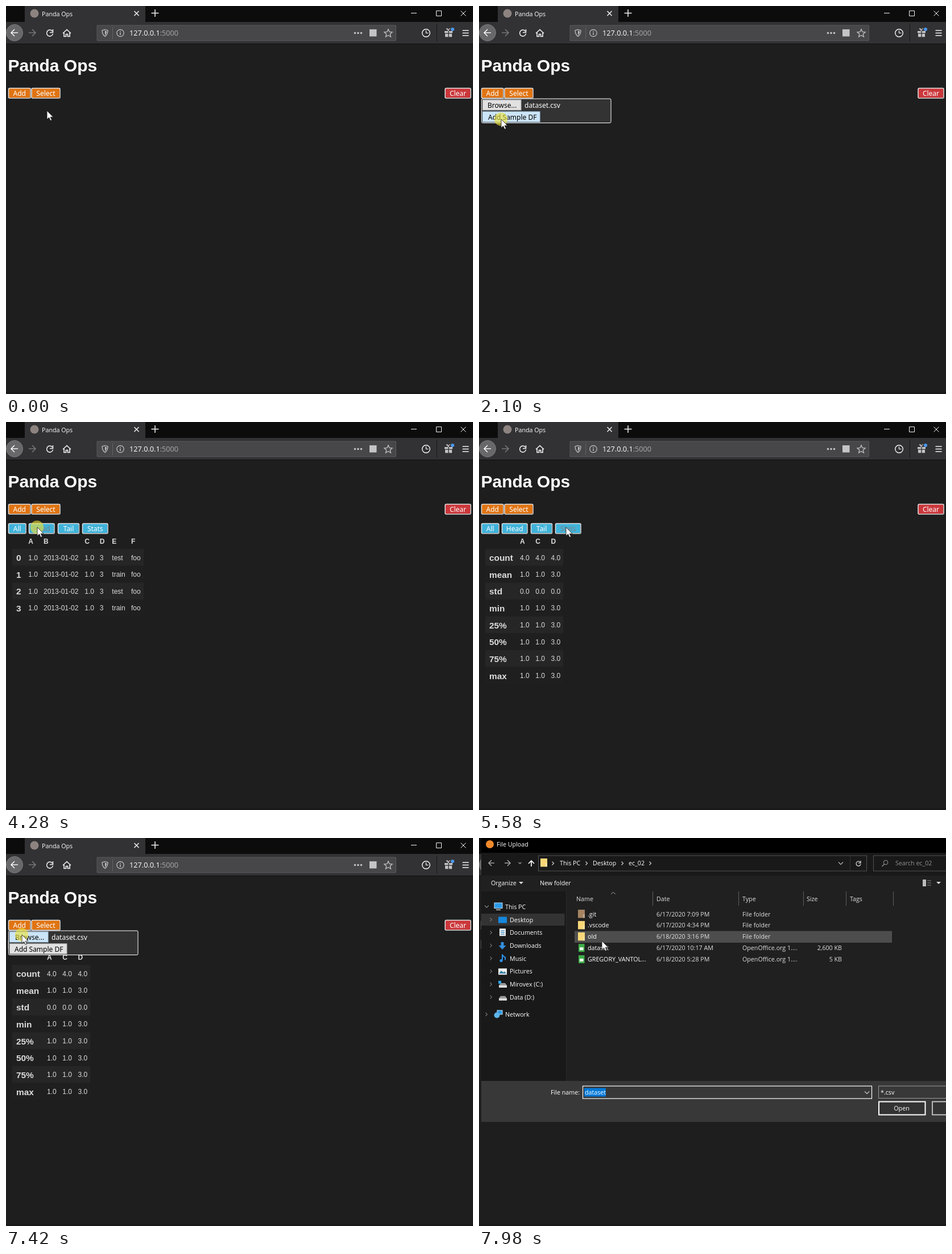
These frames come from a looping animation (821 px wide and 682 px high, 8000 ms). An HTML page:

```html
<!DOCTYPE html>
<html lang="en">
<head>
<meta charset="utf-8">
<title>Panda Ops</title>
<style>
  html, body { margin: 0; width: 100%; height: 100%; overflow: hidden; background: #1e1e1e; }
  svg { display: block; }
  text { white-space: pre; }
  .ui { font-family: "Open Sans", "Noto Sans", sans-serif; }
  .ctl { font-family: "Noto Sans", sans-serif; }
  .page { font-family: "Liberation Sans", Arial, sans-serif; }
  .bold { font-weight: bold; }
  .btn.hover text { fill: gray; }
  .native rect { fill: #e1e1e1; stroke: #adadad; }
  .native.hover rect { fill: #e5f1fb; stroke: #0078d7; }
  .native.down rect { fill: #cce4f7; stroke: #a9cdea; }
  .native.down text { transform: translateX(1px); }
</style>
</head>
<body>
<script>
const LOOP = 8000;

// Markup helpers
const rect = (x, y, w, h, fill, extra = '') =>
  `<rect x="${x}" y="${y}" width="${w}" height="${h}" fill="${fill}" ${extra}/>`;
const line = (d, color = '#fff', width = 1.2, fill = 'none') =>
  `<path d="${d}" stroke="${color}" stroke-width="${width}" fill="${fill}"/>`;
const circle = (x, y, r, fill, extra = '') =>
  `<circle cx="${x}" cy="${y}" r="${r}" fill="${fill}" ${extra}/>`;
const text = (x, y, s, size, fill = '#fff', cls = 'ui', anchor = 'start') =>
  `<text x="${x}" y="${y}" font-size="${size}" fill="${fill}" class="${cls}" text-anchor="${anchor}">${s}</text>`;
const group = (id, body, extra = '') => `<g id="${id}" ${extra}>${body}</g>`;
const chevRight = (x, y, color) => line(`M${x - 1.5} ${y - 3}l3 3l-3 3`, color, 1.1);
const chevDown = (x, y, color, s = 4) => line(`M${x - s} ${y - s / 2}l${s} ${s}l${s} ${-s}`, color, 1.1);
const triangle = (x, y) => `<path d="M${x - 4} ${y - 2}h8l-4 4z" fill="#ddd"/>`;
const arrow = (x, y, dir, color, s = 6) =>
  line(`M${x - s * dir} ${y}h${2 * s * dir}m${-s * dir} ${-s}l${s * dir} ${s}l${-s * dir} ${s}`, color, 1.6);
const reload = (x, y, r, color) =>
  line(`M${x + r * .8} ${y - r * .6}A${r} ${r} 0 1 0 ${x + r} ${y + 1}M${x + r} ${y - r - 1}v${r}h${-r}`, color, 1.5);

// Buttons with an outset border
const buttons = [
  ['Add', 4, 144, 39.5, '#e07412'], ['Select', 44.5, 144, 51, '#e07412'], ['Clear', 771.5, 144, 46, '#cb373b'],
  ['All', 4, 178, 31.5, '#40b3da'], ['Head', 40, 178, 45.5, '#40b3da'],
  ['Tail', 91, 178, 38, '#40b3da'], ['Stats', 134, 178, 45.5, '#40b3da']
];
const button = ([label, x, y, w, fill]) => group(label,
  rect(x + .5, y + .5, w - 1, 17.5, fill, 'rx="2" stroke="#e4e4e4" stroke-width="1.5"') +
  line(`M${x + 2} ${y + 18}h${w - 4}q1.5 0 1.5 -1.5v-14`, '#a9a9a9', 1.3) +
  text(x + w / 2, y + 14, label, 12, '#fff', 'ctl', 'middle'), 'class="btn"');

function browserChrome() {
  const w = '#f4f4f4', soft = '#c4c4c6';
  return rect(0, 0, 821, 28, '#0c0c0d') + rect(33, 0, 212, 28, '#323234') +
    circle(50, 13, 7.5, '#8d8380') + text(63, 18, 'Panda Ops', 10.7) +
    line('M225.5 9l8 8m0 -8l-8 8M262 6v13m-6.5 -6.5h13', w, 1.5) +
    group('controls', line('M712 12.5h10M756.5 8.5h9v9h-9zM799.5 8.5l9 9m0 -9l-9 9', w, 1)) +
    rect(0, 28, 821, 38, '#323234') + rect(0, 66, 821, 1, '#111') +
    circle(15, 47, 14.5, '#68686b', 'stroke="#7b7b7e"') + arrow(15, 47, -1, w) + arrow(46, 47, 1, '#77777a') +
    reload(77, 47.5, 5.5, w) +
    line('M100 48l7 -6.5l7 6.5M102 47v6.5h3.5v-4h3v4h3.5v-6.5', w, 1.6) +
    rect(160, 34, 525.5, 27, '#474749', 'stroke="#5b5b5d" rx="1"') +
    line('M174 41.5l5 1.5q0 7 -5 10.5q-5 -3.5 -5 -10.5z', soft, 1.3) + `<path d="M174 43.5l3 1q0 4 -3 7z" fill="${soft}"/>` +
    rect(187, 37, 1, 21, '#626264') + circle(201, 47.5, 6.2, 'none', `stroke="${soft}" stroke-width="1.2"`) +
    line('M201 46.5v4.5M201 43.8v1.4', soft, 1.4) +
    text(217, 52, '127.0.0.1<tspan fill="#a9a9ab">:5000</tspan>', 12.7) +
    [613.5, 619, 624.5].map(x => circle(x, 47.5, 1.8, soft)).join('') +
    rect(639, 41, 12.5, 12.5, soft) +
    line('M672 40.8l2 4.7l5 .4l-3.8 3.3l1.2 5l-4.4 -2.7l-4.4 2.7l1.2 -5l-3.8 -3.3l5 -.4z', soft, 1.3) +
    circle(738.5, 47.5, 6.8, 'none', `stroke="${w}" stroke-width="1.4"`) + line('M738.5 43v4.5h4', w) +
    rect(757, 31, 1, 32, '#19191a') +
    rect(771, 44, 6.3, 3.5, soft) + rect(778.7, 44, 6.3, 3.5, soft) + rect(772, 48.8, 5.3, 5.5, soft) +
    rect(778.7, 48.8, 5.3, 5.5, soft) + line('M778 43.5q-5 -4 -3 -4q2 0 3 4q1 -4 3 -4', soft) +
    circle(785, 41, 3, '#4a9af0') + line('M802.5 43h11m-11 4.5h11m-11 4.5h11', w, 1.5);
}

function table(id, width, columns, rows) {
  const pitch = 29.65;
  return group(id,
    columns.map(([x, name]) => text(x, 213.5, name, 12, '#dcdcdc', 'page bold')).join('') +
    rows.map(([head, ...cells], i) => {
      const y = 223 + i * pitch;
      return rect(11, y, width, pitch, i % 2 ? '#1f1f1f' : '#262626') +
        text(18, y + 21, head, 15.4, '#dcdcdc', 'page bold') +
        cells.map((c, k) => text(columns[k][0], y + 19.5, c, 12, '#dcdcdc', 'page')).join('');
    }).join(''));
}

const dataRows = [0, 1, 2, 3].map(i => [i, '1.0', '2013-01-02', '1.0', '3', i % 2 ? 'train' : 'test', 'foo']);
const statRows = ['count', 'mean', 'std', 'min', '25%', '50%', '75%', 'max'].map(name =>
  name === 'count' ? [name, '4.0', '4.0', '4.0'] : name === 'std' ? [name, '0.0', '0.0', '0.0'] : [name, '1.0', '1.0', '3.0']);

const nativeButton = (id, x, y, w, label) =>
  group(id, rect(x + .5, y + .5, w - 1, 18, '') + text(x + 9, y + 14.2, label, 12, '#000', 'ctl'), 'class="native"');
const panel = group('panel', rect(4.5, 163, 227.5, 42.5, '#333', 'stroke="#fff" rx="2"') +
  nativeButton('browse', 6, 164.5, 68.5, 'Browse...') + nativeButton('sample', 6, 185.3, 101.5, 'Add Sample DF') +
  text(80, 178.7, 'dataset.csv', 12, '#fff', 'ctl'));

function dialog() {
  const size = 10.7, label = (x, y, s, fill = '#fff', anchor) => text(x, y, s, size, fill, 'ui', anchor);
  const folder = (x, y, fill) => rect(x, y, 12, 14.5, fill) + rect(x + 9, y + 8, 3, 6.5, '#fff', 'opacity=".3"');
  const screen = (x, y) => rect(x, y, 14, 9.5, '#2d9be8', 'stroke="#bfe1f5"') + rect(x + 3, y + 11.5, 8, 1.5, '#ccc');
  const drive = (x, y) => `<path d="M${x} ${y + 4}l3 -4h8l3 4z" fill="#999"/>` + rect(x, y + 4, 14, 4, '#ddd');
  const icons = [
    y => rect(34, y - 5, 15, 11, '#1687dc'),
    y => rect(36, y - 7, 11, 13, '#f2f2f2') + line(`M38 ${y - 3}h7m-7 3h7m-7 3h7`, '#3788c0'),
    y => `<path d="M38.5 ${y - 6}h5v6h4l-6.5 7l-6.5 -7h4z" fill="#3490dc"/>`,
    y => line(`M41 ${y + 4}v-11q1 4 5 5v5`, '#2c8fe6', 2) + circle(39, y + 4, 2.6, '#2c8fe6'),
    y => rect(34, y - 5, 15, 11, '#f2f2f2') + `<path d="M35 ${y + 4}l4 -5l4 3l2 -2l3 4z" fill="#337c9e"/>`,
    y => drive(35, y - 2) + rect(34, y - 6, 5, 5, '#2aa5e8'),
    y => drive(35, y - 2)
  ];
  const places = ['Desktop', 'Documents', 'Downloads', 'Music', 'Pictures', 'Mirovex (C:)', 'Data (D:)'];
  const files = [
    ['.git', '6/17/2020 7:09 PM'], ['.vscode', '6/17/2020 4:34 PM'], ['old', '6/18/2020 3:16 PM'],
    ['dataset', '6/17/2020 10:17 AM', '2,600 KB'], ['GREGORY_VANTOL...', '6/18/2020 5:28 PM', '5 KB']
  ];
  const headers = [[171, 'Name', 305], [312, 'Date', 456], [463, 'Type', 570], [576, 'Size', 645], [652, 'Tags', 728]];
  return group('dialog',
    rect(4, -20, 900, 519, '#202020') + rect(4, -20, 900, 46, '#000') + rect(4, 26, 900, 40, '#191919') +
    rect(4, 94, 149, 333, '#191919') + rect(153, 94, 1, 333, '#2b2b2b') + rect(4, 427, 900, 72, '#383838') +
    circle(19, 11, 7, '#f28a2c') + label(31, 15, 'File Upload') +
    arrow(22, 44, -1, '#a0a0a0', 5) + arrow(50, 44, 1, '#a0a0a0', 5) + chevDown(72, 44, '#aaa', 2.5) +
    line('M92 50v-10m-5 5l5 -5l5 5', '#fff', 1.7) +
    rect(104.5, 31, 577, 27, '#191919', 'stroke="#535353"') + folder(108, 36, '#f8d779') +
    [130, 189, 252, 301].map(x => chevRight(x, 44.5, '#ddd')).join('') +
    label(142, 48, 'This PC') + label(200, 48, 'Desktop') + label(263, 48, 'ec_02') +
    chevDown(636, 44.5, '#bbb') + rect(652, 31, 1, 27, '#333') + reload(667, 45, 4, '#bbb') +
    rect(693.5, 31, 200, 27, '#191919', 'stroke="#535353"') +
    circle(715, 43, 3.8, 'none', 'stroke="#999"') + line('M712.5 46l-4 4', '#999') + label(732, 48, 'Search ec_02', '#929292') +
    label(21, 83, 'Organize') + triangle(74, 79) + label(107, 83, 'New folder') +
    rect(780, 73, 6, 12, '#bbb') + line('M788 75h7m-7 4h7m-7 4h7', '#888') + triangle(808, 79) +
    line('M232 98.5l4 -3l4 3', '#999', 1) +
    headers.map(([x, s, edge]) => label(x, 110.5, s, '#dedede') + rect(edge, 94, 1, 25, '#5e5e5e')).join('') +
    rect(4, 133, 146.5, 21, '#333') +
    group('placeHover', rect(4, 155.5, 146.5, 22, '#4d4d4d')) + group('fileHover', rect(168, 163.5, 558, 20.5, '#4d4d4d')) +
    chevDown(13.5, 120.5, '#888', 3.5) + screen(27, 114) + label(46, 124.5, 'This PC') +
    places.map((s, i) => {
      const y = 143.5 + i * 22.7;
      return chevRight(21, y, '#777') + icons[i](y) + label(54, y + 4, s);
    }).join('') +
    chevRight(13, 310, '#777') + rect(32, 303, 9, 7, '#2d9be8', 'stroke="#bfe1f5"') +
    circle(31.5, 311.5, 5, '#5eb5ea') + label(46, 313.5, 'Network') +
    files.map(([name, date, bytes = ''], i) => {
      const y = 133.5 + i * 19.9;
      return (bytes ? rect(175, y - 7, 10.5, 14, '#3fae49') + rect(177, y - 1, 6.5, 5, '#effaef')
        : folder(174, y - 7.5, i ? '#f8d779' : '#a58462')) +
        label(191, y + 4, name) + label(312, y + 4, date, '#dedede') +
        label(463, y + 4, bytes ? 'OpenOffice.org 1....' : 'File folder', '#dedede') + label(638, y + 4, bytes, '#dedede', 'end');
    }).join('') +
    label(126, 451, 'File name:') + rect(182.5, 436, 508, 22, '#383838', 'stroke="#fff" stroke-width="1.2"') +
    rect(185, 439.5, 38, 15, '#0078d7') + label(186, 451, 'dataset') + chevDown(682, 447.5, '#ccc') +
    rect(702.5, 436, 200, 21.5, '#383838', 'stroke="#9b9b9b"') + label(706, 451, '*.csv') +
    rect(703, 463.5, 81.5, 23, '#333', 'stroke="#fff" stroke-width="2"') + label(743, 479, 'Open', '#fff', 'middle') +
    rect(797, 463.5, 81.5, 23, '#333', 'stroke="#ddd" stroke-width="1.6"') + label(839, 479, 'Cancel', '#fff', 'middle'));
}

document.body.innerHTML = `<svg width="821" height="682" viewBox="0 0 821 682">` +
  rect(0, 0, 821, 682, '#1e1e1e') + rect(0, 678, 821, 4, '#191919') + browserChrome() +
  text(3.5, 115, 'Panda Ops', 30, '#fff', 'page bold') +
  buttons.slice(0, 3).map(button).join('') + group('ops', buttons.slice(3).map(button).join('')) +
  table('data', 231, [[39.3, 'A'], [66, 'B'], [138.3, 'C'], [164.8, 'D'], [186.3, 'E'], [220, 'F']], dataRows) +
  table('stats', 137, [[72, 'A'], [99.3, 'C'], [126.6, 'D']], statRows) +
  panel + dialog() + group('pointer', circle(-.5, 0, 11.7, '#ece23a', 'id="press" opacity=".62"') +
  '<path d="M0 0V15.3L3.6 12L6.2 17.6L8.6 16.5L6.1 11.2H11Z" fill="#fff" stroke="#111" stroke-width=".8"/>') + '</svg>';

// Pointer stops: time, x, y
const path = [
  [0, 72, 184], [250, 72, 184], [410, 60, 155], [720, 60, 155], [1020, 26, 156], [1590, 26, 156], [1870, 39, 199],
  [2500, 39, 199], [2820, 70, 156], [3400, 70, 156], [3580, 80, 172], [3850, 22, 184], [4200, 55, 185],
  [4400, 55, 185], [5010, 157, 187], [5420, 157, 187], [5580, 153, 185], [5720, 153, 185], [5760, 148, 184],
  [5920, 148, 184], [6370, 26, 156], [7010, 26, 156], [7270, 28, 170], [7500, 28, 170], [7810, 151, 176], [7980, 216, 181]
];
const presses = [[2100, 2260], [4240, 4400], [5050, 5280], [7420, 7500]];
const menus = [[870, 2724], [6246, 7660]];
const DIALOG_AT = 7700;

const $ = id => document.getElementById(id);
const within = (t, spans) => spans.some(([a, b]) => t >= a && t < b);
const clamp = v => Math.max(0, Math.min(1, v));
const show = (id, on) => $(id).style.display = on ? '' : 'none';

function pointerAt(t) {
  const i = path.findIndex(stop => stop[0] > t);
  if (i < 0) return path.at(-1).slice(1);
  const [t0, x0, y0] = path[i - 1], [t1, x1, y1] = path[i];
  const p = (t - t0) / (t1 - t0), e = p * p * (3 - 2 * p);
  return [x0 + (x1 - x0) * e, y0 + (y1 - y0) * e];
}

function draw(t) {
  const [x, y] = pointerAt(t);
  const over = (l, top, w, h) => x >= l && x < l + w && y >= top && y < top + h;
  const open = within(t, menus), pressed = within(t, presses), modal = t >= DIALOG_AT, loaded = t >= 2260;
  const statsShown = t >= 5200;

  show('panel', open);
  show('ops', loaded);
  show('data', loaded && !statsShown);
  show('stats', statsShown);
  show('press', pressed);
  for (const [label, l, top, w] of buttons) {
    const reachable = !modal && (top < 160 || loaded && !open);
    $(label).classList.toggle('hover', reachable && over(l, top, w, 19));
  }
  for (const [id, top, w] of [['browse', 164, 69], ['sample', 185, 101]]) {
    const hover = open && over(6, top, w, 20);
    $(id).classList.toggle('hover', hover);
    $(id).classList.toggle('down', hover && pressed);
  }

  const p = clamp((t - DIALOG_AT) / 200), scale = 1 - .126 * (1 - p) ** 3;
  show('dialog', modal);
  $('controls').setAttribute('opacity', modal ? .5 : 1);
  $('dialog').setAttribute('opacity', clamp((t - DIALOG_AT) / 140));
  $('dialog').setAttribute('transform', `translate(426 185) scale(${scale}) translate(-426 -185)`);
  show('placeHover', over(4, 155, 150, 23));
  show('fileHover', over(168, 163, 558, 21));
  $('pointer').setAttribute('transform', `translate(${x} ${y})`);
}

function tick() {
  draw(performance.now() % LOOP);
  requestAnimationFrame(tick);
}
tick();
</script>
</body>
</html>
```
